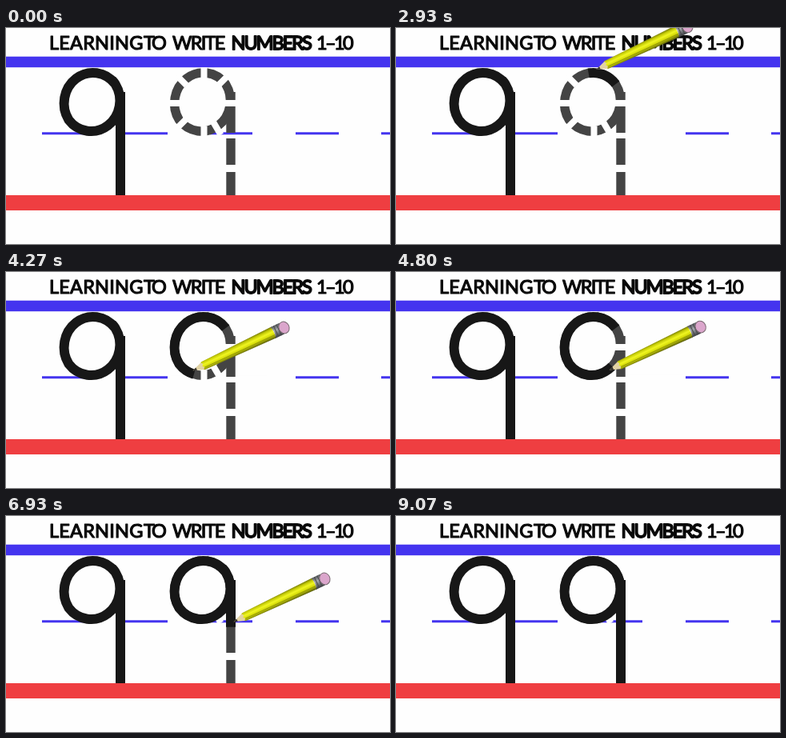
An HTML page for the animation above (9190 ms loop, 480 px wide and 270 px high).

```html
<!DOCTYPE html>
<html lang="en">
<head>
<meta charset="utf-8">
<title>Learning to write numbers</title>
<style>
  html, body { margin: 0; width: 100%; height: 100%; overflow: hidden; background: #fefefe; }
  svg { display: block; width: 100vw; height: 100vh; }
  text { font: 400 23.5px Lato, "Open Sans", sans-serif; fill: #090909; stroke: #090909; stroke-width: 1.2; stroke-linejoin: round; }
  .ink { fill: none; stroke: #171717; stroke-width: 12; }
  .guide { fill: none; stroke: #444; stroke-width: 11.4; }
</style>
</head>
<body>
<svg viewBox="0 0 480 270">
  <defs>
    <linearGradient id="paint" x1="0" y1="0" x2="0" y2="1">
      <stop offset="0" stop-color="#6f7404"/>
      <stop offset=".2" stop-color="#c4ca06"/>
      <stop offset=".42" stop-color="#f0f622"/>
      <stop offset=".65" stop-color="#d3d906"/>
      <stop offset="1" stop-color="#51550a"/>
    </linearGradient>
    <linearGradient id="metal" x1="0" y1="0" x2="0" y2="1">
      <stop offset="0" stop-color="#55585c"/>
      <stop offset=".4" stop-color="#a6a9ae"/>
      <stop offset="1" stop-color="#3c3e42"/>
    </linearGradient>
    <!-- Starts at 36 degrees, runs counter-clockwise and overlaps its start by 10 degrees -->
    <path id="loop" pathLength="370" d="M29.1-22.4A36 38.2 0 0 0-29.1 22.4A36 38.2 0 0 0 29.1-22.4A36 38.2 0 0 0 25-27.5"/>
  </defs>

  <rect width="480" height="270" fill="#fefefe"/>
  <text y="26.7">
    <tspan x="54" letter-spacing=".2">LEARNING</tspan>
    <tspan x="172" letter-spacing="-3">TO</tspan>
    <tspan x="208" letter-spacing="-1.7">WRITE</tspan>
    <tspan x="281.5" letter-spacing="-2" stroke-width="1.8" style="stroke-width: 1.8">NUMBERS</tspan>
    <tspan x="388" letter-spacing="-2.6">1–10</tspan>
  </text>

  <path d="M45 131.7H98M148 131.7H202M255 131.7H308M362 131.7H416M469 131.7H480" stroke="#4434ef" stroke-width="3"/>
  <rect id="cover" width="121" height="90" fill="#fefefe"/>
  <rect y="35.7" width="480" height="13.5" fill="#4434ef"/>
  <rect y="209" width="480" height="19" fill="#ef3e41"/>

  <g transform="translate(107.5 92.5)" class="ink">
    <use href="#loop"/>
    <path d="M35.5-12.5V116.5"/>
  </g>

  <g transform="translate(245.5 92.5)">
    <g class="guide">
      <use href="#loop"/>
      <path d="M35.5-12.5V38.5M35.5 45.5V78.5M35.5 87.5V116.5"/>
    </g>
    <!-- Gaps cut across the dashed ring -->
    <path d="M2-43.3V-30M2 30V45M-44 1.5H-28M28 1.5H43M-32-33L-20-21M-32 33L-20 21M32-33L20-21M13 24L23 41" stroke="#fefefe" stroke-width="8"/>
    <g class="ink">
      <use id="ring" href="#loop"/>
      <path id="stem"/>
    </g>
  </g>

  <g id="pencil">
    <path d="M0 0L15-5.5V5.5Z" fill="#e2d3a4"/>
    <path d="M0 0L5-1.9V1.9Z" fill="#33312c"/>
    <path d="M13-5L15-5.5L112-7.6V7.6L15 5.5L13 5L15 2L13 0L15-2Z" fill="url(#paint)"/>
    <path d="M15 2.6L112 3.4" stroke="#8d9208" stroke-width=".8"/>
    <path d="M111-7.6H123V7.6H111Q114 0 111-7.6Z" fill="url(#metal)"/>
    <path d="M115-7.5V7.5M119-7.5V7.5" stroke="#46484a"/>
    <ellipse cx="126" rx="6.5" ry="7.5" fill="#dba6cc" stroke="#77686f"/>
  </g>
</svg>

<script>
const LOOP = 9190;
const $ = id => document.getElementById(id);
const ramp = (t, a, b) => Math.min(1, Math.max(0, (t - a) / (b - a)));
const show = (el, on) => el.setAttribute("visibility", on ? "visible" : "hidden");

function tipAt(t) {
  const a = (28 + 360 * ramp(t, 2400, 5560)) * Math.PI / 180;
  const x = 249.5 + 33 * Math.cos(a), y = 90 - 38 * Math.sin(a);
  const shift = ramp(t, 5560, 5870);
  return [x + (284.5 - x) * shift, y + (73.3 - y) * shift + 129.2 * ramp(t, 5870, 8195)];
}

function draw(t) {
  const [x, y] = tipAt(t);

  $("ring").setAttribute("stroke-dasharray", 370 * ramp(t, 2400, 5600) + " 999");
  show($("ring"), t >= 2400);
  $("stem").setAttribute("d", `M35.5-12.5V${y + 6.5 - 92.5}`);
  show($("stem"), t >= 5870);

  $("pencil").setAttribute("transform", `translate(${x} ${y}) rotate(-25.3)`);
  $("pencil").setAttribute("opacity", ramp(t, 1400, 1730));
  show($("pencil"), t >= 1400 && t < 8330);

  // Paper around the pencil hides part of the middle line while the ring is drawn
  $("cover").setAttribute("x", x - 28);
  $("cover").setAttribute("y", y + 6);
  show($("cover"), t >= 2400 && t < 5560);
}

function frame() {
  draw(performance.now() % LOOP);
  requestAnimationFrame(frame);
}
frame();
</script>
</body>
</html>
```
